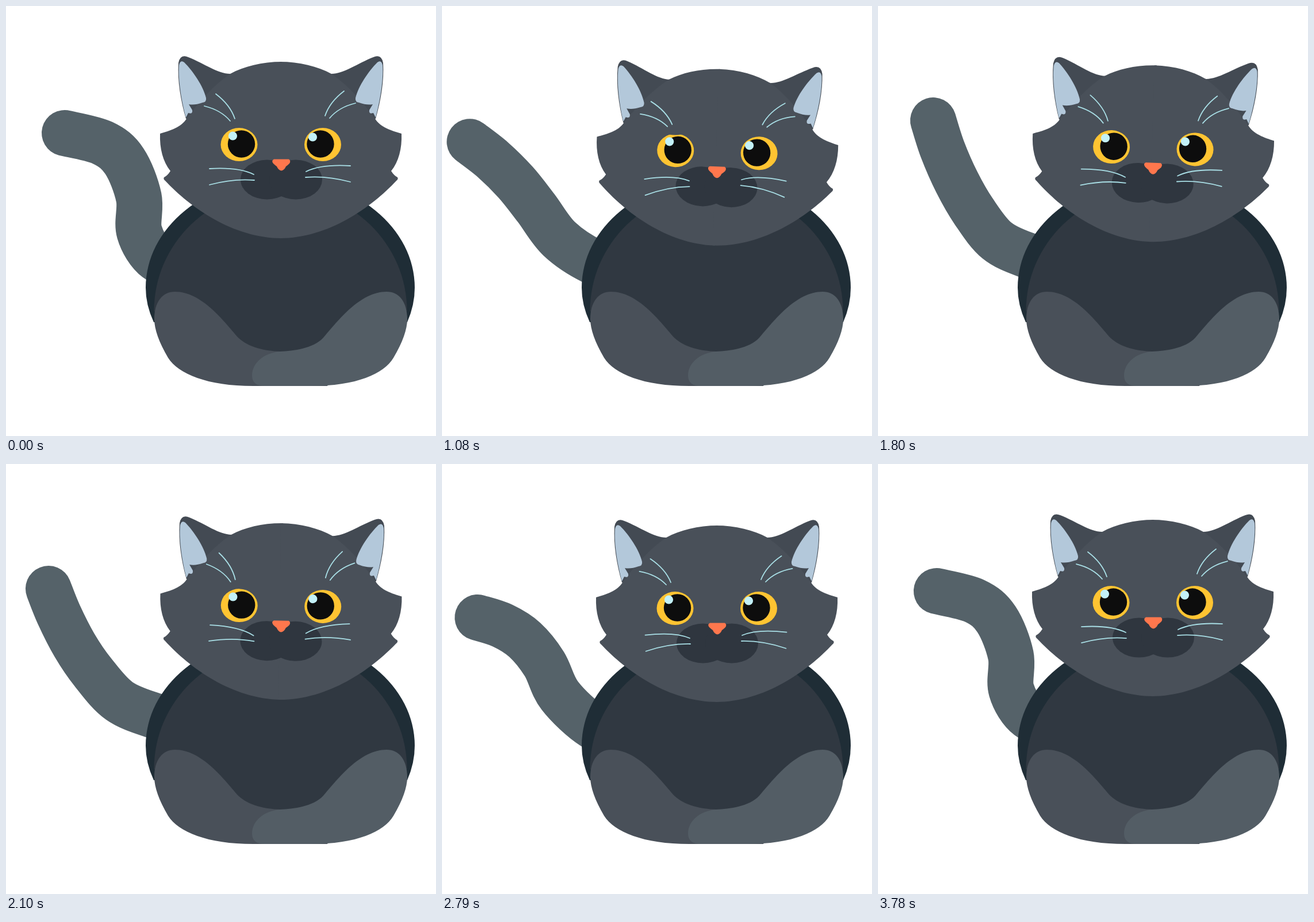
Recreate the animation shown at these times as an HTML page with a canvas. Size 748 by 748 pixels, loop 3.81 s.

```html
<!DOCTYPE html>
<html lang="en">
<head>
<meta charset="utf-8">
<title>Sleepy cat</title>
<style>
html, body { margin: 0; width: 100%; height: 100%; overflow: hidden; background: #fff; }
canvas { display: block; }
</style>
</head>
<body>
<canvas id="stage" width="748" height="748"></canvas>
<script>
const LOOP = 3810;
const ctx = document.getElementById('stage').getContext('2d');

// Tail centre line: time, then x,y from tip to root
const tailKeys = [
  [0, 102, 221, 168, 238, 206, 270, 231, 333, 232, 393, 262, 440],
  [630, 57, 262, 107, 279, 150, 304, 186, 350, 212, 400, 265, 455],
  [960, 44, 244, 85, 271, 126, 307, 162, 350, 203, 404, 263, 448],
  [1530, 91, 207, 118, 255, 147, 307, 175, 360, 212, 408, 262, 434],
  [1800, 96, 199, 112, 249, 137, 306, 167, 358, 207, 408, 260, 434],
  [2100, 74, 217, 92, 262, 119, 315, 151, 362, 197, 412, 258, 438],
  [2480, 50, 246, 87, 272, 125, 307, 158, 352, 198, 408, 260, 448],
  [2790, 62, 267, 105, 281, 144, 306, 178, 348, 205, 403, 262, 456],
  [3330, 90, 234, 157, 251, 199, 285, 224, 338, 228, 397, 262, 444]
];
// Time, head drop, head tilt, whisker swing (degrees)
const headKeys = [
  [0, 0, 0, 0], [630, 6.5, 0.8, 7.5], [1530, 16.5, 2.8, 5], [1870, 5, 1.4, -3],
  [2100, 6, 0.7, -5.5], [2790, 10, 0, 3.5], [3330, 5, 0, 1.5]
];
const lidKeys = [[0, 0], [850, 0], [1400, 1], [1600, 1], [1850, 0]];

const shape = d => new Path2D(d);
const body = shape('M243 490A234 190 0 0 1 711 490Q711 520 698 550H257Q243 520 243 490Z');
const chest = shape('M257.5 530A220 212 0 0 1 697.5 530L660 620H300Z');
const leftLeg = shape('M258 545C258 515 272 497 294 497C340 497 378 547 404 577C422 594 450 600 477 601L560 661H430C350 661 300 640 282 612C266 585 258 562 258 545Z');
const rightLeg = shape('M698 545C698 515 684 497 662 497C616 497 578 547 552 577C534 596 500 600 477 601C450 603 428 620 428 643C428 655 436 661 450 661H530C610 661 657 640 674 612C690 585 698 562 698 545Z');
const ear = shape('M392 118C370 119 345 100 317 89Q303 83 300 99C298 130 304 165 313 196L345 200Z');
const innerEar = shape('M301 103Q303 93 310 98C325 113 343 139 348 160Q349 167 342 168Q328 173 318 171L324 181Q325 189 317 186L313 194C306 168 299 130 301 103Z');
const halfHead = shape('M480 97C445 97 414 105 390 118C360 138 335 168 314 196C305 211 285 217 268 222C267 248 273 271 286 287Q281 295 275 298Q273 301 277 304C320 350 395 404 480 404Z');
const nose = shape('M466 266.5H492Q496 269 493 274Q490 277 487 279Q484 286 479 286.5Q474 286 471 279Q468 277 465 274Q461 269 466 266.5Z');

// Each whisker: outer tip, control point, inner end
const whiskers = [
  [365, 153, 390, 172, 398, 196], [345, 174, 374, 181, 390, 200],
  [354, 283, 405, 280, 431, 293], [354, 311, 395, 300, 432, 303]
];

// Periodic cubic interpolation that rests at every extreme
function sample(keys, t) {
  const n = keys.length;
  const key = i => {
    const turn = Math.floor(i / n), k = keys[i - turn * n];
    return [k[0] + turn * LOOP, ...k.slice(1)];
  };
  let i = n - 1;
  while (keys[i][0] > t) i--;
  const [a, b, c, d] = [key(i - 1), key(i), key(i + 1), key(i + 2)];
  const span = c[0] - b[0], u = (t - b[0]) / span;
  const slope = (p, q, r, j) =>
    (q[j] - p[j]) * (r[j] - q[j]) <= 0 ? 0 : (r[j] - p[j]) / (r[0] - p[0]);
  return b.slice(1).map((v, k) => {
    const j = k + 1, w = u * u * (3 - 2 * u);
    return v + (c[j] - v) * w
      + span * u * (1 - u) * ((1 - u) * slope(a, b, c, j) - u * slope(b, c, d, j));
  });
}

function fill(path, color) {
  ctx.fillStyle = color;
  ctx.fill(path);
}

function ellipse(x, y, rx, ry, color) {
  ctx.beginPath();
  ctx.ellipse(x, y, rx, ry, 0, 0, 2 * Math.PI);
  ctx.fillStyle = color;
  ctx.fill();
}

function scoped(draw) {
  ctx.save();
  draw();
  ctx.restore();
}

function bothSides(draw, dx = 0, dy = 0) {
  draw();
  scoped(() => {
    ctx.translate(956 + dx, dy);
    ctx.scale(-1, 1);
    draw();
  });
}

function drawTail(t) {
  const v = sample(tailKeys, t), p = [];
  for (let i = 0; i < v.length; i += 2) p.push([v[i], v[i + 1]]);
  p.push([312, p[5][1] + 14]);
  const at = i => p[Math.max(0, Math.min(p.length - 1, i))];
  ctx.beginPath();
  ctx.moveTo(...p[0]);
  for (let i = 0; i < p.length - 1; i++) {
    const [a, b, c, d] = [at(i - 1), at(i), at(i + 1), at(i + 2)];
    ctx.bezierCurveTo(
      b[0] + (c[0] - a[0]) / 6, b[1] + (c[1] - a[1]) / 6,
      c[0] - (d[0] - b[0]) / 6, c[1] - (d[1] - b[1]) / 6, ...c);
  }
  ctx.lineWidth = 80;
  ctx.lineCap = ctx.lineJoin = 'round';
  ctx.strokeStyle = '#556269';
  ctx.stroke();
}

function drawWhiskers(swing) {
  ctx.strokeStyle = '#a9dfe6';
  ctx.lineWidth = 1.8;
  for (const [x, y, cx, cy, px, py] of whiskers) {
    scoped(() => {
      ctx.translate(px, py);
      ctx.rotate(-swing);
      ctx.beginPath();
      ctx.moveTo(x - px, y - py);
      ctx.quadraticCurveTo(cx - px, cy - py, 0, 0);
      ctx.stroke();
    });
  }
}

function drawEye(x, pupilX, shineX, shineY, lid, pose) {
  scoped(() => {
    const y = 180 + 75 * lid;
    ctx.beginPath();
    ctx.moveTo(x - 40, y);
    ctx.quadraticCurveTo(x, y + 32, x + 40, y);
    ctx.lineTo(x + 40, 340);
    ctx.lineTo(x - 40, 340);
    ctx.clip();
    pose();
    ellipse(x, 241, 32, 29, '#ffc432');
    ellipse(pupilX, 240, 23.7, 23.7, '#0d0d0d');
    ellipse(shineX, shineY, 7.6, 7.6, '#c3f1f8');
  });
}

function drawHead(t) {
  const [drop, tilt, swing] = sample(headKeys, t);
  const [lid] = sample(lidKeys, t);
  const rad = Math.PI / 180;
  const pose = () => {
    ctx.translate(478, 260 + drop);
    ctx.rotate(tilt * rad);
    ctx.translate(-478, -260);
  };
  scoped(() => {
    pose();
    bothSides(() => fill(ear, '#434a53'));
    bothSides(() => fill(halfHead, '#495059'));
    bothSides(() => fill(innerEar, '#b3c8da'));
    ellipse(454, 302, 46, 34.5, '#2f363f');
    ellipse(504, 302, 46, 34.5, '#2f363f');
    fill(nose, '#ff774d');
  });
  drawEye(405.5, 409.5, 394.5, 226, lid, pose);
  drawEye(551, 547, 533.5, 228, lid, pose);
  scoped(() => {
    pose();
    bothSides(() => drawWhiskers(swing * rad), -3, -5);
  });
}

function frame() {
  const t = performance.now() % LOOP;
  ctx.fillStyle = '#fff';
  ctx.fillRect(0, 0, 748, 748);
  drawTail(t);
  fill(body, '#1f2d36');
  fill(chest, '#303841');
  fill(leftLeg, '#495059');
  fill(rightLeg, '#535d65');
  drawHead(t);
  requestAnimationFrame(frame);
}
frame();
</script>
</body>
</html>
```
